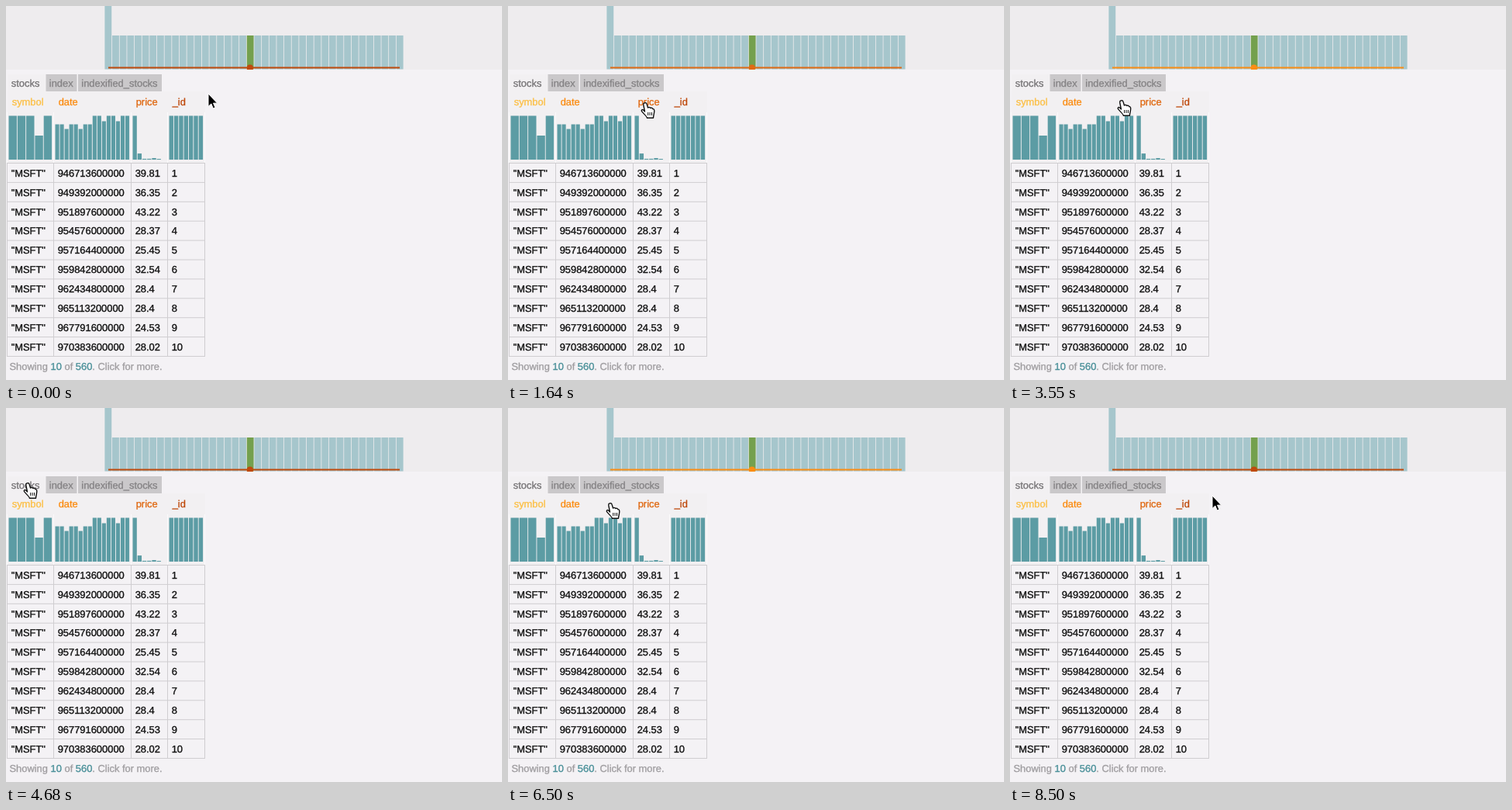
Animation of 640x482 px, one loop 8550 ms. Source, as an HTML page:

```html
<!DOCTYPE html>
<html lang="en">
<head>
<meta charset="utf-8">
<title>Column hover</title>
<style>
html, body { margin: 0; width: 100%; height: 100%; overflow: hidden; background: #f4f2f5; }
svg { display: block; width: 640px; height: 482px; }
text {
  font: 12.9px "Liberation Sans", Arial, sans-serif;
  white-space: pre;
  text-rendering: geometricPrecision;
  stroke-width: .35px;
}
</style>
</head>
<body>
<svg viewBox="0 0 640 482">
  <rect width="640" height="82" fill="#eeecee"/>
  <g id="chart"></g>
  <g id="mark">
    <path d="M132 79.5H508" stroke="currentColor" stroke-width="2.2"/>
    <path d="M310.8 82V79A4 3.6 0 0 1 318.8 79V82Z" fill="currentColor"/>
  </g>
  <g id="table"></g>
  <g id="arrow">
    <path d="M0 0V16.5L3.8 13L6.3 19L9 17.8L6.5 12.2H11.6Z" fill="#000" stroke="#fff"/>
  </g>
  <g id="hand" stroke="#111" stroke-linejoin="round">
    <path transform="translate(-7 -1)" stroke-width="1.4" fill="#fff" d="M5 1C6.5 .2 7.8 1 8.3 3L9.5 7C11 6 12.5 6.8 12.8 7.6C14 6.9 15.5 7.5 15.8 8.7C17 8.3 17.7 9.5 17.8 11C17.9 14 16.8 15.5 16.5 20.3H8.5C8 18 4 15 1.5 11.7C.8 10 2.2 9 3.6 10L5.5 12L3.8 3.5C3.6 2 4 1.3 5 1Z"/>
    <path transform="translate(-7 -1)" fill="none" d="M9.7 13V17M12.1 13V17M14.5 13V17"/>
  </g>
</svg>
<script>
const LOOP = 8550, RIGHT = 256.5, FULL = 56.5, ROW = 24.9;
const TEAL = "#5c9ca4", GRID = "#cfcdd0", GREY = "#a09ea1";
const $ = id => document.getElementById(id);

function add(parent, tag, attrs, label) {
  const el = document.createElementNS("http://www.w3.org/2000/svg", tag);
  for (const key in attrs) el.setAttribute(key, attrs[key]);
  if (label !== undefined) el.textContent = label;
  return parent.appendChild(el);
}
const rect = (parent, x, y, width, height, fill) =>
  add(parent, "rect", { x, y, width, height, fill });
const text = (x, y, label, fill) =>
  add($("table"), "text", { x, y, fill, stroke: fill }, label);
const line = (d, stroke) => add($("table"), "path", { d, stroke, fill: "none" });

const prices = [39.81, 36.35, 43.22, 28.37, 25.45, 32.54, 28.4, 28.4, 24.53, 28.02];

// Month starts in Pacific time, with summer time from the fifth row on
const monthStart = i => Date.UTC(2000, i, 1, i < 4 ? 8 : 7);

// Each column: left edge, histogram bar count and height, cell value per row
const columns = [
  { name: "symbol", color: "#fcbf45", left: 1.5, count: 5,
    bar: i => i === 3 ? 31 : FULL, value: () => '"MSFT"' },
  { name: "date", color: "#fb8d14", left: 61.5, count: 16,
    bar: i => i < 8 ? (i % 3 === 2 ? 39.5 : 45.5) : (i % 3 === 1 ? 49.5 : FULL), value: monthStart },
  { name: "price", color: "#e06a14", left: 161.5, count: 7,
    bar: i => FULL * .14 ** i + Math.max(0, 2 - Math.abs(i - 4)), value: i => prices[i] },
  { name: "_id", color: "#bf4a0d", left: 208.5, count: 7,
    bar: () => FULL, value: i => i + 1 }
];

function drawChart() {
  const pitch = 9.65;
  for (let i = 0; i < 40; i++) {
    const top = i ? 38 : 0;
    rect($("chart"), 127.4 + i * pitch, top, pitch - .8, 81.5 - top, i === 19 ? "#74a04e" : "#a6c6cc");
  }
}

function drawTab(label, x, width, active) {
  rect($("table"), x, 88, width, 22, active ? "#f2f0f2" : "#cac8ca");
  text(x + 4.3, 104, label, active ? "#767476" : "#858385");
}

function drawEdge(x) {
  line(`M${x} 137V202`, "#fbfafb");
  line(`M${x} 202V452`, GRID);
}

function drawColumn(c, k) {
  const end = k < 3 ? columns[k + 1].left : RIGHT;
  const pitch = (end - c.left - 3.5) / c.count;
  drawEdge(c.left);
  text(c.left + 6.2, 128.2, c.name, c.color);
  for (let i = 0; i < c.count; i++) {
    const h = c.bar(i);
    rect($("table"), c.left + 2 + i * pitch, 198 - h, pitch - .9, h, TEAL);
  }
  for (let i = 0; i < 10; i++) text(c.left + 5.2, 219.7 + i * ROW, c.value(i), "#111");
}

function drawTable() {
  rect($("table"), 2, 110, 255, 92, "#f2f0f2");
  drawTab("stocks", 2.5, 48, true);
  drawTab("index", 51.5, 40);
  drawTab("indexified_stocks", 93, 108);
  for (let i = 0; i <= 10; i++) line(`M1 ${202.5 + i * ROW}H257`, GRID);
  columns.forEach(drawColumn);
  drawEdge(RIGHT);

  const note = text(4.5, 469, "", GREY);
  for (const part of ["Showing ", "10", " of ", "560", ". Click for more."]) {
    const fill = +part ? "#4a9099" : GREY;
    add(note, "tspan", { fill, stroke: fill }, part);
  }
}

// Pointer stops: time, x, y
const path = [
  [0, 261, 113], [1640, 178, 125], [2640, 64, 119], [3050, 28, 122],
  [3950, 228, 122], [4150, 222, 104], [4680, 29, 97], [5400, 29, 122],
  [6500, 133, 123], [7730, 225, 121], [8400, 261, 113], [LOOP, 261, 113]
];

function pointer(t) {
  const i = path.findIndex(p => p[0] > t);
  const [a, b] = [path[i - 1], path[i]];
  const u = (t - a[0]) / (b[0] - a[0]);
  const e = u * u * (3 - 2 * u);
  return [a[1] + (b[1] - a[1]) * e, a[2] + (b[2] - a[2]) * e];
}

function columnAt([x, y]) {
  if (x > RIGHT || y < 110) return null;
  return columns.filter(c => x >= c.left).pop();
}

// The last hovered column keeps its colour until another is entered
function activeColumn(t) {
  for (let s = t; s >= 0; s -= 20) {
    const c = columnAt(pointer(s));
    if (c) return c;
  }
  return columns[3];
}

function draw(now) {
  const t = now % LOOP;
  const [x, y] = pointer(t);
  const overLink = columnAt([x, y]) || (x < 201 && y >= 88);
  $("mark").style.color = activeColumn(t).color;
  for (const [id, on] of [["arrow", !overLink], ["hand", overLink]]) {
    $(id).style.visibility = on ? "visible" : "hidden";
    $(id).setAttribute("transform", `translate(${x} ${y})`);
  }
}

drawChart();
drawTable();
const begin = performance.now();
function tick() {
  draw(performance.now() - begin);
  requestAnimationFrame(tick);
}
tick();
</script>
</body>
</html>
```
